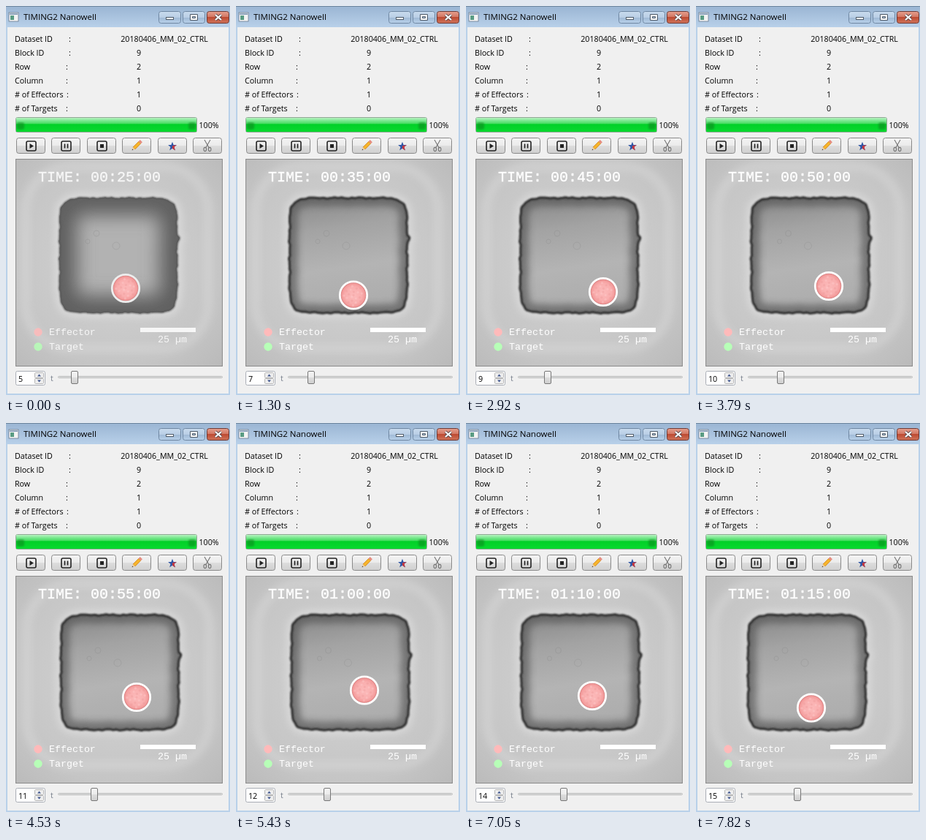
An HTML page for the animation above (8 s loop, 307 by 532 pixels).

```html
<!DOCTYPE html>
<html lang="en">
<head>
<meta charset="utf-8">
<title>TIMING2 Nanowell</title>
<style>
  html, body { margin: 0; width: 100%; height: 100%; overflow: hidden; background: #f0f0f0; }
  svg { display: block; width: 100%; height: 100%; }
  text { font: 10.7px "Open Sans", "Noto Sans", sans-serif; fill: #000; white-space: pre; }
  .title { font-size: 11.5px; }
  .mid { text-anchor: middle; }
  .overlay text { font: 13.3px "Liberation Mono", monospace; fill: #fff; }
  .overlay .clock { font-size: 20px; stroke: #fff; stroke-width: .4px; }
</style>
</head>
<body>
<svg viewBox="0 0 307 532" preserveAspectRatio="none">
  <defs>
    <linearGradient id="bar" x2="0" y2="1">
      <stop stop-color="#9ab5d3"/><stop offset="1" stop-color="#b9d1ea"/>
    </linearGradient>
    <linearGradient id="red" x2="0" y2="1">
      <stop stop-color="#e5a08f"/><stop offset=".48" stop-color="#d27662"/>
      <stop offset=".5" stop-color="#bd4a32"/><stop offset="1" stop-color="#d0745a"/>
    </linearGradient>
    <linearGradient id="glass" x2="0" y2="1">
      <stop stop-color="#c9dbee"/><stop offset=".5" stop-color="#b9cee5"/>
      <stop offset=".52" stop-color="#9fb9d5"/><stop offset="1" stop-color="#b9d1ea"/>
    </linearGradient>
    <linearGradient id="button" x2="0" y2="1">
      <stop stop-color="#f4f4f4"/><stop offset=".5" stop-color="#ebebeb"/>
      <stop offset=".52" stop-color="#dddddd"/><stop offset="1" stop-color="#cfcfcf"/>
    </linearGradient>
    <linearGradient id="green" x2="0" y2="1">
      <stop stop-color="#b9f3c2"/><stop offset=".2" stop-color="#7be890"/>
      <stop offset=".42" stop-color="#45dc5f"/><stop offset=".46" stop-color="#02d028"/>
      <stop offset="1" stop-color="#08d92e"/>
    </linearGradient>
    <radialGradient id="field" gradientUnits="userSpaceOnUse" cx="150" cy="345" r="210">
      <stop offset=".4" stop-color="#cbcbcb"/><stop offset=".7" stop-color="#c5c5c5"/>
      <stop offset="1" stop-color="#b9b9b9"/>
    </radialGradient>
    <linearGradient id="floor" x1=".4" x2=".55" y2="1">
      <stop stop-color="#8c8c8c"/><stop offset=".25" stop-color="#a3a3a3"/>
      <stop offset=".6" stop-color="#b4b4b4"/><stop offset="1" stop-color="#ababab"/>
    </linearGradient>
    <radialGradient id="cell">
      <stop stop-color="#fcbaba"/><stop offset=".65" stop-color="#f9aeae"/>
      <stop offset=".88" stop-color="#f39b9b"/><stop offset="1" stop-color="#d07878"/>
    </radialGradient>
    <filter id="blur1" x="-5%" y="-5%" width="110%" height="110%"><feGaussianBlur stdDeviation=".8"/></filter>
    <filter id="blur4" x="-20%" y="-20%" width="140%" height="140%"><feGaussianBlur stdDeviation="5"/></filter>
    <filter id="blur9" x="-30%" y="-30%" width="160%" height="160%"><feGaussianBlur stdDeviation="13"/></filter>
    <clipPath id="view"><rect x="14" y="210" width="282" height="282"/></clipPath>
    <clipPath id="inside"><path class="wellPath"/></clipPath>
  </defs>

  <rect width="307" height="532" fill="#b9d1ea"/>
  <rect width="307" height="30" fill="url(#bar)"/>
  <path d="M0 .5H307" stroke="#6f879f"/>
  <rect x="2" y="29" width="303" height="501" fill="#f0f0f0"/>
  <g id="chrome"></g>

  <g clip-path="url(#view)">
    <rect x="13" y="209" width="284" height="284" fill="url(#field)"/>
    <g id="plate">
      <rect x="27" y="220" width="250" height="248" rx="60" fill="none" stroke="#dcdcdc" stroke-width="13" opacity=".4" filter="url(#blur4)"/>
      <path class="wellPath" fill="none" stroke="#e6e6e6" stroke-width="14" opacity=".5" filter="url(#blur4)"/>
      <path class="wellPath" fill="url(#floor)"/>
      <g clip-path="url(#inside)">
        <path class="wellPath" fill="none" stroke="#555" stroke-width="22" opacity=".65" filter="url(#blur4)"/>
        <g id="dim">
          <path class="wellPath" fill="#b2b2b2"/>
          <path class="wellPath" fill="none" stroke="#5e5e5e" stroke-width="46" filter="url(#blur9)"/>
        </g>
        <g fill="none" stroke="#777" opacity=".2">
          <circle cx="124" cy="311" r="4"/><circle cx="151" cy="328" r="5"/><circle cx="112" cy="322" r="3"/>
        </g>
      </g>
      <path class="wellPath" id="edge" fill="none" stroke-linejoin="round" filter="url(#blur1)"/>
    </g>
    <g id="effector">
      <circle r="17.7" fill="url(#cell)"/>
      <g id="spots"></g>
      <circle id="ring" r="18.7" fill="none" stroke-width="2.8"/>
    </g>
    <g class="overlay" id="overlay">
      <text class="clock" id="clock" x="44" y="240"></text>
      <circle cx="44" cy="446" r="5.7" fill="#ffbaba"/><text x="59" y="450">Effector</text>
      <circle cx="44" cy="466" r="5.7" fill="#b7ffb7"/><text x="59" y="470">Target</text>
      <rect x="184" y="440" width="76" height="6" fill="#fff"/><text x="208" y="460">25 µm</text>
    </g>
  </g>
  <rect x="13.5" y="209.5" width="283" height="283" fill="none" stroke="#8b8b8b"/>

  <text id="count" x="17" y="514"></text>
  <g id="knob">
    <rect x="-4.5" y="499.5" width="9" height="17" rx="1.5" fill="url(#button)" stroke="#777"/>
  </g>
</svg>
<script>
const $ = id => document.getElementById(id);
const label = (x, y, s, cls = '') => `<text x="${x}" y="${y}" class="${cls}">${s}</text>`;
const box = (x, y, w, h, fill, stroke, rx = 2) =>
  `<rect x="${x + .5}" y="${y + .5}" width="${w - 1}" height="${h - 1}" rx="${rx}" fill="${fill}" stroke="${stroke}"/>`;

function titleBar() {
  const caption = [209, 242, 275].map((x, i) =>
    box(x, 7, 31, 17, i === 2 ? 'url(#red)' : 'url(#glass)', i === 2 ? '#6f3a35' : '#6f87a2', 3)).join('');
  return `<rect x="4" y="9" width="13" height="12" fill="#f4f4f4" stroke="#66788c" stroke-width=".8"/>
    <rect x="5" y="10" width="11" height="2" fill="#8fa5bd"/>
    <rect x="6" y="13" width="5" height="6" fill="#5a9c84"/>` +
    label(24, 19, 'TIMING2 Nanowell', 'title') + caption +
    `<g fill="#fff" stroke="#4e5a68"><rect x="219.5" y="15.5" width="10" height="3"/>
      <path fill-rule="evenodd" d="M252.5 11.5h10v8h-10zM255.5 14.5h4v2h-4z"/></g>
    <path d="M287 12l8 7m0-7l-8 7" stroke="#59464a" stroke-width="4"/>
    <path d="M287 12l8 7m0-7l-8 7" stroke="#fff" stroke-width="2.3"/>`;
}

function infoRows() {
  const rows = [['Dataset ID', 86, 217, '20180406_MM_02_CTRL'], ['Block ID', 86, 182, 9], ['Row', 82, 182, 2],
    ['Column', 82, 182, 1], ['# of Effectors', 83, 182, 1], ['# of Targets', 82, 182, 0]];
  return rows.map(([name, colon, x, value], i) => {
    const y = 49 + i * 19;
    return label(12, y, name) + label(colon, y, ':') + label(x, y, value, 'mid');
  }).join('');
}

function progress() {
  return box(13, 152, 249, 21, '#e6e6e6', '#8fa893') +
    `<rect x="14" y="153" width="247" height="19" fill="url(#green)"/>
    <g fill="#087f1c" opacity=".5" filter="url(#blur1)">
      <rect x="15" y="159" width="10" height="10" rx="3"/><rect x="250" y="159" width="10" height="10" rx="3"/></g>` +
    label(264.5, 167, '100%');
}

function toolbar() {
  const frame = '<rect x="-6" y="-6" width="13" height="13" rx="2" fill="none" stroke="#222" stroke-width="1.6"/>';
  const icons = [
    frame + '<path d="M-1.5-3L4 .5-1.5 4z" fill="#222"/>',
    frame + '<path d="M-1.5-2.5v6M2.5-2.5v6" stroke="#222" stroke-width="1.7"/>',
    frame + '<rect x="-2" y="-2" width="5" height="5" fill="#222"/>',
    `<g transform="rotate(-45)"><rect x="-5" y="-2" width="11" height="4" fill="#f7b52c" stroke="#c77a16" stroke-width=".7"/>
      <path d="M-5-2L-9 0l4 2z" fill="#eed0a0"/><path d="M-9 0l1.7-1v2z" fill="#333"/>
      <rect x="6" y="-2.2" width="3" height="4.4" fill="#e68c80"/></g>`,
    `<g transform="translate(0 1) scale(.85)"><path d="M0-7.5L1.9-2.5 7-2.3 3 1 4.5 6.5 0 3.3-4.5 6.5-3 1-7-2.3-1.9-2.5z" fill="#2e55a5"/>
      <path d="M0-1L7-2.3 3 1 4.5 6.5 0 3.3z" fill="#c7383e"/></g>`,
    `<g fill="none" stroke="#757575" stroke-width="1.1"><path d="M-4-8L2.3 3M4-8L-2.3 3"/>
      <ellipse cx="-3.2" cy="5" rx="1.8" ry="2.6"/><ellipse cx="3.2" cy="5" rx="1.8" ry="2.6"/></g>`
  ];
  return icons.map((icon, i) => {
    const x = Math.round(14 + i * 48.4);
    return box(x, 180, 40, 22, 'url(#button)', '#8a8a8a', 3) + `<g transform="translate(${x + 20} 191)">${icon}</g>`;
  }).join('');
}

function controls() {
  return box(13, 499, 41, 20, '#fff', '#a9adb5') + box(39, 501, 13, 8, '#eee', '#b5b5b5', 1) +
    box(39, 509, 13, 8, '#eee', '#b5b5b5', 1) +
    '<path d="M43 506.5l2.5-3 2.5 3zM43 511.5l2.5 3 2.5-3z" fill="#40568f"/>' +
    '<text x="61" y="513" style="fill:#777f8c">t</text>' + box(71, 506, 226, 3, '#e7eaea', '#b5b5b5', 1);
}

// Rounded square with a slightly uneven rim and a notch on its right side.
function wellPath() {
  const n = 8, count = 260, points = [];
  for (let i = 0; i < count; i++) {
    const a = i / count * 2 * Math.PI, c = Math.cos(a), s = Math.sin(a);
    const r = (Math.abs(c) ** n + Math.abs(s) ** n) ** (-1 / n);
    const wobble = .5 * Math.sin(17 * a) + .4 * Math.sin(41 * a + 1) + .25 * Math.sin(67 * a + 2) +
      2.5 * Math.exp(-(((a - 6.01) / .05) ** 2));
    points.push(`${(154 + c * (r * 80.5 + wobble)).toFixed(1)} ${(341 + s * (r * 78.5 + wobble)).toFixed(1)}`);
  }
  return `M${points.join('L')}Z`;
}

$('chrome').innerHTML = titleBar() + infoRows() + progress() + toolbar() + controls();
const rim = wellPath();
document.querySelectorAll('.wellPath').forEach(p => p.setAttribute('d', rim));
$('spots').innerHTML = Array.from({ length: 20 }, (_, i) => {
  const a = i * 2.4, r = 3.2 * Math.sqrt(i);
  return `<circle cx="${r * Math.cos(a)}" cy="${r * Math.sin(a)}" r="1.6" fill="${i % 2 ? '#ffd0d0' : '#ec9797'}" opacity=".35"/>`;
}).join('');

// start time, cell x, cell y, plate shift
const steps = [
  [0, 164, 386, 0], [580, 163, 391, 0], [1300, 161, 395.5, 0], [2180, 194.5, 399.5, 0],
  [2920, 188, 391, 1], [3790, 182, 383, 2.5], [4530, 179, 375, 2], [5430, 176, 365.5, 2.5],
  [6300, 187, 355.5, 2.5], [7050, 173, 373, 2.5], [7820, 158, 389.5, -2]
];
const LOOP = 8000;
const pad = n => String(n).padStart(2, '0');
let shown = -1;

function show(i) {
  const [, x, y, shift] = steps[i], t = i + 5, minutes = t * 5, dim = i === 0;
  $('effector').setAttribute('transform', `translate(${x} ${y})`);
  $('plate').setAttribute('transform', `translate(${shift} 0)`);
  $('knob').setAttribute('transform', `translate(${Math.round(93.5 + i * 4.5)} 0)`);
  $('clock').textContent = `TIME: ${pad(Math.floor(minutes / 60))}:${pad(minutes % 60)}:00`;
  $('count').textContent = t;
  $('dim').style.display = dim ? '' : 'none';
  $('edge').style.stroke = dim ? '#555' : '#333';
  $('edge').style.strokeWidth = dim ? 2 : 3.2;
  $('overlay').style.opacity = dim ? .85 : 1;
  $('ring').style.stroke = dim ? '#ededed' : '#fff';
}

function tick(now) {
  const time = now % LOOP;
  const i = steps.findLastIndex(step => step[0] <= time);
  if (i !== shown) show(shown = i);
  requestAnimationFrame(tick);
}
show(shown = 0);
requestAnimationFrame(tick);
</script>
</body>
</html>
```
